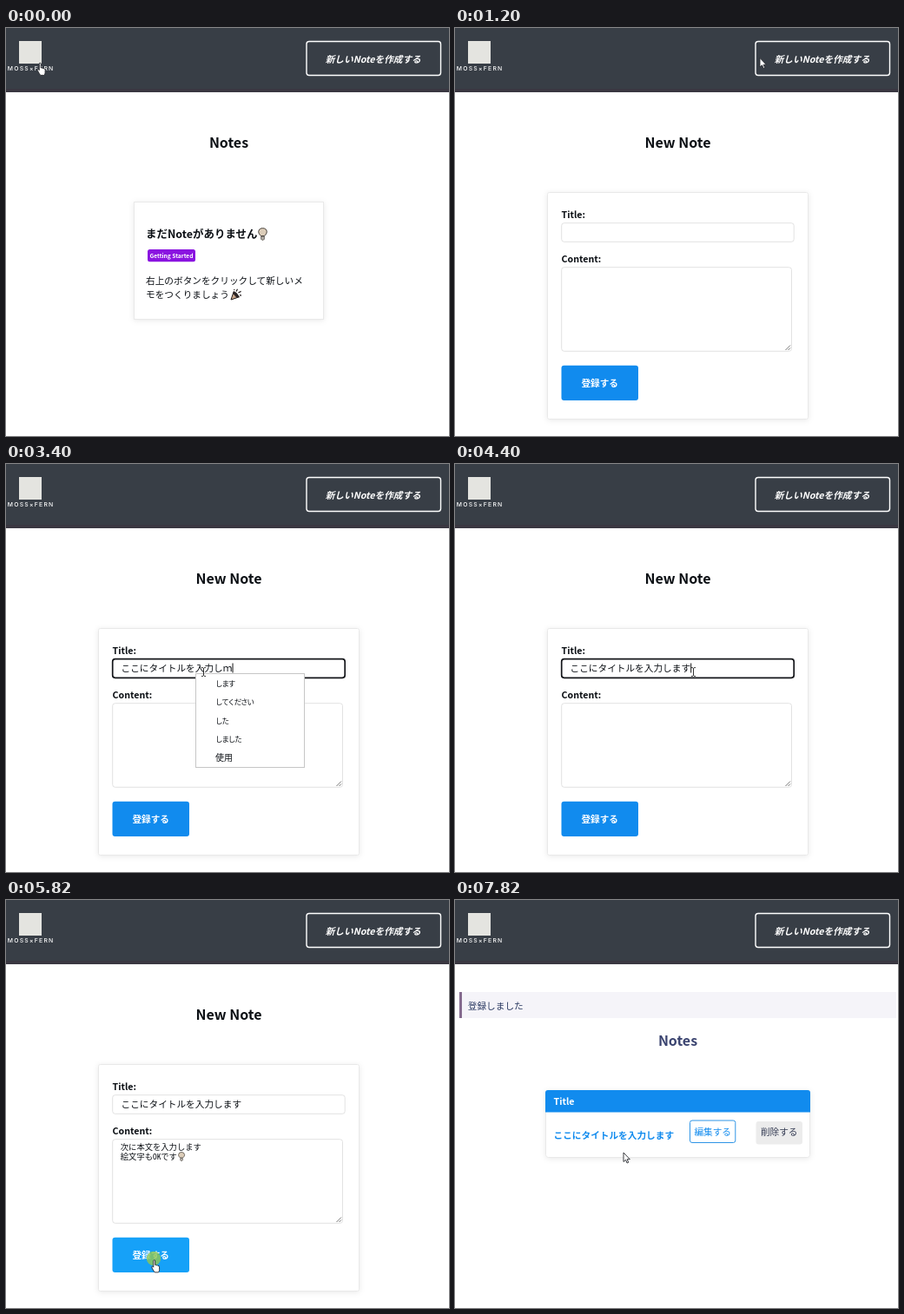
Animation, 510 px wide and 470 px high, one loop 8000 ms. Source, as an HTML page:

```html
<!DOCTYPE html>
<html lang="ja">
<head>
<meta charset="utf-8">
<title>Notes</title>
<style>
  html, body { margin: 0; width: 100%; height: 100%; overflow: hidden; background: #fff; }
  svg { display: block; width: 100%; height: 100%; }
  text {
    font-family: "Noto Sans CJK JP", "Noto Sans CJK", "Noto Sans JP", sans-serif;
    font-size: 10.67px; fill: #0b0f14; white-space: pre;
  }
  .bold { font-weight: 700; }
  .head { font-size: 16px; font-weight: 700; }
  .white { fill: #fff; }
  .brand { font-family: Inter, sans-serif; font-size: 6.8px; font-weight: 500; letter-spacing: 1.25px; }
  .mono { font-family: "Noto Sans Mono CJK JP", "Noto Sans CJK JP", "Noto Sans CJK", monospace; font-size: 9.3px; }
  .option { font-size: 10px; }
  .kana { font-size: 8.5px; letter-spacing: -1.1px; }
  .panel { fill: #fff; stroke: #e9e9e9; filter: drop-shadow(0 1px 3px rgba(0, 0, 0, .09)); }
  .field { fill: #fff; stroke: #e2e2e2; }
  .field.focus { stroke: #14161a; stroke-width: 1.7; }
  .caret { stroke: #111; stroke-width: 1; }
</style>
</head>
<body>
<svg viewBox="0 0 510 470">
  <defs>
    <g id="bulb">
      <path d="M3.5 9.5Q.6 7 .7 4.9Q1 .7 5.5.6Q10 .7 10.3 4.9Q10.4 7 7.5 9.5Z" fill="#dccdb9" stroke="#4a443f"/>
      <path d="M3.7 10h3.6v3.2l-1 1H4.7l-1-1z" fill="#b9b4ad" stroke="#4a443f" stroke-width=".8"/>
    </g>
    <g id="popper">
      <path d="M1 13L4.2 3.5L10.5 9.8Z" fill="#c9a78c" stroke="#241f20"/>
      <path d="M4.2 3.5Q8 3.8 10.5 9.8L7.5 10.8L3.4 6Z" fill="#2b2526"/>
      <path d="M7 3.5L8.5.8M9.4 5l3.2-1.6M11 7.6l2 .6M5 2l-.4-1" stroke="#2b2526" stroke-width="1.3"/>
    </g>
  </defs>

  <rect width="510" height="74" fill="#383e46"/>
  <rect y="70" width="510" height="4" fill="#3a3741"/>
  <rect x="15" y="15" width="26" height="26" fill="#e4e4e0"/>
  <text class="brand white" x="1.8" y="49.3">MOSS×FERN</text>
  <rect id="navHover" x="340" y="9.5" width="167" height="51" fill="#535965"/>
  <rect x="346" y="15.5" width="154.5" height="39" rx="3" fill="none" stroke="#fff" stroke-width="1.4"/>
  <text class="bold white" x="367.7" y="39.5" font-style="italic">新しいNoteを作成する</text>

  <g id="empty">
    <text class="head" x="256.5" y="138" text-anchor="middle">Notes</text>
    <rect class="panel" x="147.5" y="200.5" width="218" height="135"/>
    <text class="bold" x="161" y="241.7" style="font-size:12.48px">まだNoteがありません</text>
    <use href="#bulb" x="290" y="230"/>
    <rect x="163" y="255" width="55" height="14.3" rx="2.5" fill="#8a14e0"/>
    <text class="bold white" x="190.5" y="264.9" text-anchor="middle" style="font-size:6.67px">Getting Started</text>
    <text x="161" y="295">右上のボタンをクリックして新しいメ</text>
    <text x="161" y="311">モをつくりましょう</text>
    <use href="#popper" x="258" y="300"/>
  </g>

  <g id="form">
    <text class="head" x="256.5" y="138" text-anchor="middle">New Note</text>
    <rect class="panel" x="106.5" y="189.5" width="300" height="261" rx="2"/>
    <text class="bold" x="122.5" y="219">Title:</text>
    <rect id="titleField" class="field" x="122.7" y="224.7" width="267.5" height="21.6" rx="3"/>
    <text id="titleText" x="132.5" y="239"></text>
    <text class="bold" x="122.5" y="270">Content:</text>
    <rect id="bodyField" class="field" x="122.7" y="275.7" width="264.8" height="96.6" rx="3"/>
    <path d="M380.5 371l5.5-5.5M383.5 371l2.5-2.5" stroke="#666" stroke-width=".9"/>
    <g id="bodyText">
      <text class="mono" x="131.8" y="288">次に本文を入力します</text>
      <text class="mono" x="131.8" y="299">絵文字もOKです</text>
      <use href="#bulb" transform="translate(198 290) scale(.74)"/>
    </g>
    <rect id="submit" x="122.5" y="388.7" width="88.5" height="40.3" rx="3"/>
    <text class="bold white" x="166.7" y="413" text-anchor="middle">登録する</text>
    <path id="caret" class="caret"/>
    <g id="popup"></g>
  </g>

  <g id="list">
    <rect x="5" y="106" width="503" height="30" fill="#f5f4f9"/>
    <rect x="5" y="106" width="3" height="30" fill="#856b8f"/>
    <text x="14.8" y="125.5" fill="#2b3a62" style="fill:#2b3a62">登録しました</text>
    <text class="head" x="256.5" y="168" text-anchor="middle" style="fill:#3b4470">Notes</text>
    <rect class="panel" x="104.5" y="219.5" width="304" height="77" rx="3"/>
    <path d="M104 244.5V222q0-3 3-3h299q3 0 3 3v22.5z" fill="#118bee"/>
    <text class="bold white" x="113.5" y="236.2">Title</text>
    <text class="bold" x="113.5" y="274.5" style="fill:#118bee">ここにタイトルを入力します</text>
    <rect x="270.5" y="254" width="52.3" height="25.5" rx="2.5" fill="#fff" stroke="#2f95e6"/>
    <text x="296.7" y="271" text-anchor="middle" style="fill:#118bee">編集する</text>
    <rect x="346.5" y="255" width="53.5" height="26.5" rx="3" fill="#ececec"/>
    <text x="373.2" y="271" text-anchor="middle" style="fill:#333a52">削除する</text>
  </g>

  <circle id="click" cx="170" cy="413" r="8.2" fill="#8fc653" fill-opacity=".82"/>
  <path id="cursor"/>
</svg>

<script>
const LOOP = 8000;
const $ = id => document.getElementById(id);
const show = (id, on) => $(id).setAttribute('display', on ? 'inline' : 'none');

const cursors = {
  hand: { fill: '#fff', line: '#26292e', d: 'M3.5 1.2q1.2-.2 1.2 1.2v4.5q1.2-.6 1.6.5q1.3-.5 1.7.6q1.6-.4 1.6 1.2v3q0 2-1.2 3.2H4.2Q3 14 1.2 10.6Q.2 8.9 1.3 8.6q.8-.1 1.5 1V2.4q0-1.2.7-1.2z' },
  arrow: { fill: '#fff', line: '#26292e', d: 'M.5.5V11L3 8.8L4.6 12.5L6.2 11.8L4.7 8.2H7.8z' },
  beam: { fill: 'none', line: '#1c1c1c', d: 'M-2.5-5Q0-5 0-4Q0-5 2.5-5M0-4V4M-2.5 5Q0 5 0 4Q0 5 2.5 5' }
};

const FULL_TITLE = 'ここにタイトルを入力します';
const popupA = { x: 110, options: ['ここに', 'ここの', 'ここなら', 'ここには', '個々に'] };
const popupB = { x: 218, options: ['します', 'してください', 'した', 'しました', '使用'] };

// Each step: start time, page, cursor [kind, x, y], and page state.
const steps = [
  { at: 0, page: 'empty', cursor: ['hand', 35.5, 39] },
  { at: 800, page: 'empty', cursor: ['arrow', 134.5, 39] },
  { at: 1000, page: 'empty', cursor: ['hand', 350.5, 33], navHover: true },
  { at: 1200, page: 'form', cursor: ['arrow', 350.5, 34] },
  { at: 1600, page: 'form', cursor: ['arrow', 258, 185] },
  { at: 2000, page: 'form', cursor: ['beam', 233, 234] },
  { at: 2400, page: 'form', cursor: ['beam', 227.5, 239.5] },
  { at: 3000, page: 'form', cursor: ['beam', 227.5, 239.5], focus: 'title', title: 'ここｎ', popup: popupA },
  { at: 3400, page: 'form', cursor: ['beam', 227.5, 239.5], focus: 'title', title: 'ここにタイトルを入力しｍ', popup: popupB },
  { at: 4000, page: 'form', cursor: ['beam', 253, 236], focus: 'title', title: FULL_TITLE },
  { at: 4400, page: 'form', cursor: ['beam', 274.5, 239.5], focus: 'title', title: FULL_TITLE },
  { at: 4820, page: 'form', cursor: ['beam', 267.5, 239.5], focus: 'body', title: FULL_TITLE, body: true },
  { at: 5220, page: 'form', cursor: ['beam', 222, 287], focus: 'body', title: FULL_TITLE, body: true },
  { at: 5620, page: 'form', cursor: ['hand', 167, 413.5], focus: 'body', title: FULL_TITLE, body: true, hover: true },
  { at: 5820, page: 'form', cursor: ['hand', 167, 413.5], title: FULL_TITLE, body: true, hover: true, click: true },
  { at: 6420, page: 'list', cursor: ['arrow', 169, 414] },
  { at: 6820, page: 'list', cursor: ['arrow', 169, 408] },
  { at: 7020, page: 'list', cursor: ['arrow', 282, 378] },
  { at: 7420, page: 'list', cursor: ['arrow', 250, 342] },
  { at: 7820, page: 'list', cursor: ['arrow', 193.5, 290.5] }
];

function popupMarkup({ x, options }) {
  const rows = options.map((label, i) => {
    const kind = /[\u4e00-\u9fff]/.test(label) ? 'option' : 'option kana';
    return `<text class="${kind}" x="${x + 23}" y="${255.8 + i * 21.5}">${label}</text>`;
  });
  return `<rect x="${x + .5}" y="241.5" width="125" height="108" fill="#fff" stroke="#c6c6c6"/>` + rows.join('');
}

function caretPath({ focus, title = '' }) {
  if (focus === 'title') return `M${133 + title.length * 10.67} 229.5v11`;
  return focus === 'body' ? 'M207.5 290.5v9.5' : '';
}

function drawForm(step) {
  $('titleField').classList.toggle('focus', step.focus === 'title');
  $('bodyField').classList.toggle('focus', step.focus === 'body');
  $('titleText').textContent = step.title || '';
  show('bodyText', step.body);
  $('submit').setAttribute('fill', step.hover ? '#16a1f8' : '#118bee');
  $('caret').setAttribute('d', caretPath(step));
  $('popup').innerHTML = step.popup ? popupMarkup(step.popup) : '';
}

function drawCursor([kind, x, y]) {
  const { d, fill, line } = cursors[kind];
  const attrs = { d, fill, stroke: line, 'stroke-width': .9, transform: `translate(${x} ${y})` };
  for (const name in attrs) $('cursor').setAttribute(name, attrs[name]);
}

let current;
function render(time) {
  const step = steps.findLast(s => s.at <= time % LOOP);
  if (step === current) return;
  current = step;
  for (const page of ['empty', 'form', 'list']) show(page, page === step.page);
  show('navHover', step.navHover);
  show('click', step.click);
  drawForm(step);
  drawCursor(step.cursor);
}

const start = performance.now();
function tick() {
  render(performance.now() - start);
  requestAnimationFrame(tick);
}
tick();
</script>
</body>
</html>
```
